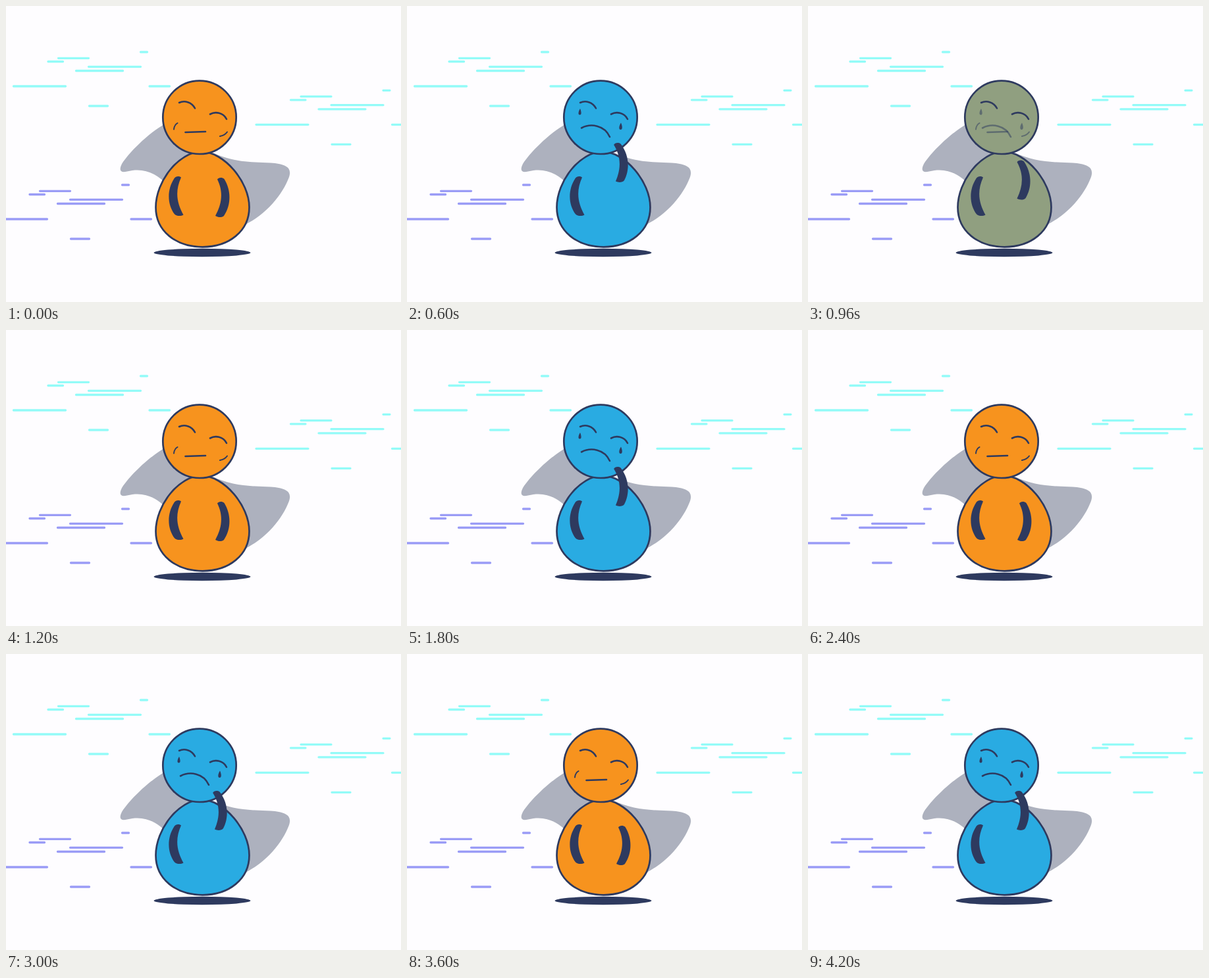
These frames come from a looping animation (600x450 px, 4560 ms). An HTML page:

```html
<!DOCTYPE html>
<html lang="en">
<head>
<meta charset="utf-8">
<title>Mood swing</title>
<style>
  html, body { margin: 0; width: 100%; height: 100%; overflow: hidden; background: #fefdff; }
  svg { display: block; width: 600px; height: 450px; }
  .line { fill: none; stroke: #2e3a5f; stroke-width: 2.6; stroke-linecap: round; }
  .skin { stroke: #2e3a5f; stroke-width: 2.7; }
  .dark { fill: #2e3a5f; }
  .streaks { stroke-width: 3.3; stroke-linecap: round; }
</style>
</head>
<body>
<svg viewBox="0 0 600 450">
  <defs>
    <path id="streaks" d="M204.500 70H214.500M79.500 79.300H125.500M64 84.500H86.500M125.500 92.300H204.500M106.500 98.500H177.500M11.500 122H90.500M218 122H248.500M126.500 152H154.500"/>
  </defs>
  <g class="streaks">
    <use href="#streaks" stroke="#93fbf8"/>
    <use href="#streaks" x="368.500" y="58.300" stroke="#93fbf8"/>
    <use href="#streaks" x="-28" y="202" stroke="#9a9cf6"/>
  </g>

  <path fill="#adb1be" d="M242 179C215 194 186 224 176 240C171 250 174 254 184 251.500C206 246 224 252 240 267L300 300L362 333C395 317 420 287 430 260C435 245 424 240 402 238.500C370 237 345 238 312 222Z"/>
  <ellipse class="dark" cx="298" cy="375" rx="73.500" ry="6.200"/>

  <g id="skin" fill="#f7931e">
    <path class="skin" d="M297 221.500C331 221.500 369.500 267 369.500 306C369.500 342 339 366.300 298.500 366.300C258 366.300 227.500 342 227.500 306C227.500 266 263 221.500 297 221.500Z"/>
    <circle class="skin" cx="294" cy="169.300" r="55.700"/>
  </g>

  <path class="line" d="M263 147C271 143 282 146 287 155.500M310 164.500C318 160 330 162 335 172"/>
  <g id="calm">
    <path class="line" d="M272.500 192L303 191"/>
    <path class="line" style="stroke-width:2" d="M255 187.500Q255.500 181 260.500 178M325 198Q332 197 336 191.500"/>
  </g>
  <g id="sad">
    <path class="line" d="M265 185.500C279 178 300 181 308 199"/>
    <path class="dark" d="M263 156C260 161 259.500 165.500 262.500 165.500S265 161 263 156ZM325 177.500C321.500 183 321.500 188 324.500 188S327.500 183 325 177.500Z"/>
  </g>

  <path class="dark" d="M266 260.500C262 258 258 259 256 261.500C244 279 245 302 256 316.500C260 320 266 319.500 269.500 317.500C260 300 256 283 266 260.500Z"/>
  <path class="dark" id="arm" d="M321 263.500C323 260.500 328 260 331.500 263C342 280 342.500 302 331 319C328 322 322 321.500 318 319C328 301 330.500 283 321 263.500Z"/>
</svg>
<script>
  const LOOP = 4560, CYCLE = 1200;
  const ORANGE = [247, 147, 30], BLUE = [41, 171, 226];
  const [skin, calm, sad, arm] = ['skin', 'calm', 'sad', 'arm'].map(id => document.getElementById(id));

  // 0 is calm, 1 is sad, with a held halfway pose on each change
  function mood(t) {
    const p = t % CYCLE;
    if (p < 360) return 0;
    return p >= 600 && p < 960 ? 1 : 0.5;
  }

  function draw(now) {
    const m = mood(now % LOOP);
    const rgb = ORANGE.map((c, i) => Math.round(c + (BLUE[i] - c) * m));
    skin.setAttribute('fill', `rgb(${rgb})`);
    calm.setAttribute('opacity', 1 - m);
    sad.setAttribute('opacity', m);
    arm.setAttribute('transform', `translate(${-4 * m} ${-53 * m}) rotate(${-6 * m} 325 291)`);
    requestAnimationFrame(() => draw(performance.now()));
  }
  draw(performance.now());
</script>
</body>
</html>
```
